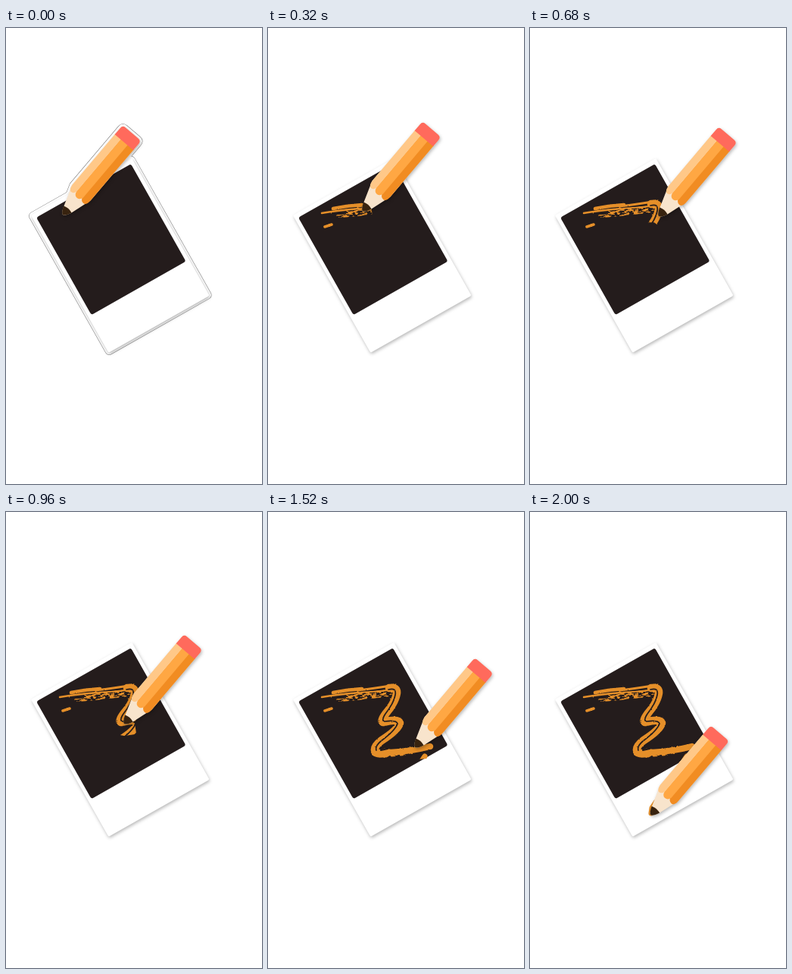
Write an HTML page that moves like this. It is 338 px wide and 601 px high and loops after 3000 ms.

```html
<!DOCTYPE html>
<html lang="en">
<head>
<meta charset="utf-8">
<title>Pencil on a photo card</title>
<style>
  html, body { margin: 0; width: 100%; height: 100%; overflow: hidden; background: #fff; }
  svg { display: block; width: 100%; height: 100%; }
  .lift { filter: drop-shadow(1px 2px 2px rgba(0, 0, 0, .28)); }
  .paint { fill: none; stroke: #e58f29; stroke-linecap: round; stroke-linejoin: round; }
  .gap { stroke: #241c1c; }
</style>
</head>
<body>
<svg viewBox="0 0 338 601">
  <defs>
    <filter id="rough" filterUnits="userSpaceOnUse" x="50" y="210" width="190" height="210" color-interpolation-filters="sRGB">
      <feTurbulence type="fractalNoise" baseFrequency=".35" numOctaves="2" seed="4"/>
      <feDisplacementMap in="SourceGraphic" scale="2" xChannelSelector="R" yChannelSelector="G"/>
    </filter>
    <filter id="dry" filterUnits="userSpaceOnUse" x="50" y="210" width="190" height="210" color-interpolation-filters="sRGB">
      <feTurbulence type="fractalNoise" baseFrequency=".16 .5" numOctaves="2" seed="9" result="n"/>
      <feColorMatrix in="n" values="0 0 0 0 0  0 0 0 0 0  0 0 0 0 0  0 0 0 9 -4" result="holes"/>
      <feComposite in="SourceGraphic" in2="holes" operator="in"/>
    </filter>
    <mask id="reveal" maskUnits="userSpaceOnUse" x="0" y="0" width="338" height="601">
      <path id="trail" fill="none" stroke="#fff" stroke-width="32" stroke-linejoin="round"/>
    </mask>
    <rect id="sheet" width="153" height="208" rx="2" transform="translate(33 247) rotate(-29.5)"/>
    <path id="body" d="M-16-38V-136Q-16-141-11-141H11Q16-141 16-136V-38L7-9Q3 0 0 0T-6-9Z"/>
  </defs>

  <g id="rim" stroke-linejoin="round">
    <g stroke="#777" stroke-width="7.2"><use href="#sheet"/><use href="#body" class="held"/></g>
    <g stroke="#fff" fill="#fff" stroke-width="6.2"><use href="#sheet"/><use href="#body" class="held"/></g>
  </g>

  <g class="lift"><use href="#sheet" fill="#fff"/></g>
  <rect x="4.8" y="5.9" width="143.4" height="147.5" rx="3" fill="#241c1c" transform="translate(33 247) rotate(-29.5)"/>

  <g id="flick" class="paint" filter="url(#rough)"><path d="M75 262L84 259" stroke-width="3.6"/></g>
  <g class="paint" mask="url(#reveal)">
    <g filter="url(#dry)">
      <path d="M92 248Q115 247 160 241" stroke-width="4"/>
      <path d="M104 242Q140 240 163 237" stroke-width="7"/>
      <path d="M138 318Q142 323 158 321L180 319" stroke-width="4"/>
    </g>
    <g filter="url(#rough)">
      <path d="M86 238Q105 234 124 233" stroke-width="4.6"/>
      <path d="M71 244Q88 241 120 238" stroke-width="2.4"/>
      <path d="M118 235Q145 232 166 228" stroke-width="3.2"/>
      <path d="M120 238Q140 237 158 235" stroke-width="2"/>
      <path d="M160 232Q171 230 170 239Q168 251 156 265Q147 277 153 277Q172 272 174 278Q172 287 150 301Q138 310 142 317Q146 319 156 318" stroke-width="10.5"/>
      <path d="M154 316L162 317Q190 315 214 309" stroke-width="8.4"/>
      <path d="M207 322L196 339L161 390L160 397" stroke-width="7"/>
    </g>
    <g class="gap" filter="url(#rough)">
      <path d="M159 234Q170 231 168 241Q166 252 155 266Q149 275 154 276Q170 274 171 279Q168 288 149 302Q141 309 143 314" stroke-width="1.7"/>
      <path d="M149 314L158 312" stroke-width="2"/>
    </g>
  </g>

  <g class="lift">
    <g class="held">
      <use href="#body" fill="#f8e4cc"/>
      <path d="M-6.5-9.5Q0-12 7.2-9.5Q3 0 0 0T-6.5-9.5Z" fill="#38230f"/>
      <path d="M4-126H16V-38Q16-29 11-29T4-36Z" fill="#f18c22"/>
      <path d="M-6-126H6V-35Q5-29 0-29T-6-35Z" fill="#ffa743"/>
      <path d="M-16-126H-6V-35Q-7-30-11-30T-16-38Z" fill="#ffc888"/>
      <path d="M-16-125V-136Q-16-141-11-141H11Q16-141 16-136V-125Z" fill="#ff6a5c"/>
    </g>
  </g>
</svg>
<script>
  const LOOP = 3000, STEP = 40, END = 2000;
  const TILT = 40.3;
  // time, x, y of the pencil tip
  const keys = [
    [0, 75, 246], [320, 125, 241], [560, 169, 240], [600, 171, 241],
    [680, 170, 248], [880, 154, 271], [960, 156, 279], [1040, 170, 277],
    [1120, 169, 284], [1280, 147, 306], [1400, 143, 315], [1440, 163, 315],
    [1520, 194, 310], [1600, 211, 309], [1680, 203, 335], [END, 159.5, 399.2]
  ];
  const $ = id => document.getElementById(id);
  const held = document.querySelectorAll('.held');

  function tipAt(t) {
    const i = Math.max(1, keys.findIndex(k => k[0] >= t));
    const [t0, x0, y0] = keys[i - 1], [t1, x1, y1] = keys[i];
    const p = (t - t0) / (t1 - t0);
    return [x0 + (x1 - x0) * p, y0 + (y1 - y0) * p];
  }

  function trailTo(t) {
    // paint runs slightly ahead of the tip
    const head = Math.min(END, t + 60 + t / 50);
    const pts = keys.filter(k => k[0] < head).map(k => [k[1], k[2]]);
    const tail = head === END ? [[156, 405]] : [];
    return 'M' + [[62, 247], ...pts, tipAt(head), ...tail].join('L');
  }

  function draw(now) {
    const t = Math.min(END, Math.floor(now % LOOP / STEP) * STEP);
    const [x, y] = tipAt(t);
    held.forEach(el => el.setAttribute('transform', `translate(${x} ${y}) rotate(${TILT})`));
    $('trail').setAttribute('d', t ? trailTo(t) : 'M0 0');
    $('flick').style.display = t >= 80 ? '' : 'none';
    $('rim').style.display = t ? 'none' : '';
  }

  const start = performance.now();
  function tick() {
    draw(performance.now() - start);
    requestAnimationFrame(tick);
  }
  tick();
</script>
</body>
</html>
```
